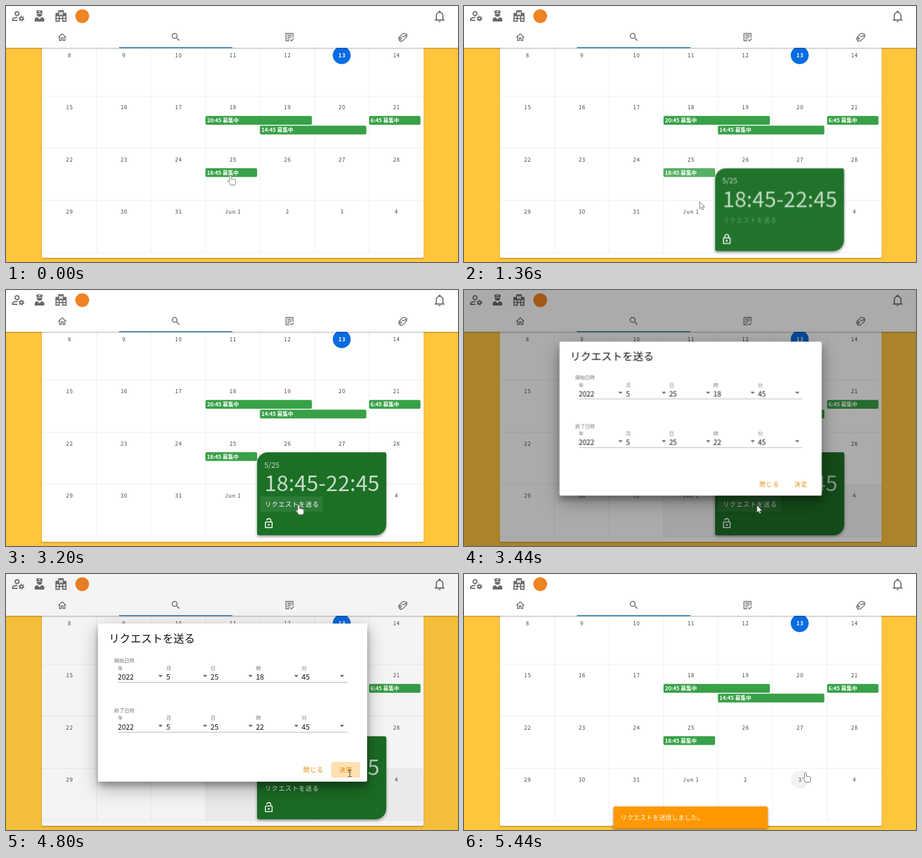
Write an HTML page that moves like this. It is 756 px wide and 429 px high and loops after 5520 ms.

```html
<!DOCTYPE html>
<html lang="ja">
<head>
<meta charset="utf-8">
<title>シフトのリクエスト</title>
<style>
html, body { margin: 0; width: 100%; height: 100%; overflow: hidden; background: #ffc53d; }
svg { display: block; width: 756px; height: 429px; }
text { font-family: "Noto Sans CJK JP", "Noto Sans JP", "Noto Sans", sans-serif; }
.day { font-size: 9px; letter-spacing: .9px; text-anchor: middle; fill: #444; }
.event rect { fill: #38a147; }
.event text { font-size: 9px; font-weight: 700; fill: #fff; }
.icon { fill: #6b6b6b; }
.line { fill: none; stroke: #6b6b6b; }
.request { font-size: 10.5px; letter-spacing: .85px; fill: #fff; }
.title { font-size: 18px; font-weight: 300; fill: #111; }
.label { font-size: 8.4px; fill: #777; }
.value { font-size: 12px; font-weight: 300; fill: #111; }
.action { font-size: 10.5px; letter-spacing: .9px; font-weight: 500; fill: #e08a00; }

.anim { animation: 5520ms cubic-bezier(.25, .8, .25, 1) infinite both; }
.step { animation-timing-function: step-end; }
#pressed { animation-name: pressed; }
#card { animation-name: card; transform-origin: 420px 272px; }
.locked { animation-name: locked; }
.unlocked { animation-name: unlocked; }
#halo { animation-name: halo; }
#focus { animation-name: focus; }
#outside { animation-name: outside; }
#shade { animation-name: shade; animation-timing-function: ease; }
#dialog { animation-name: dialog; transform-origin: 379px 215.5px; }
#ripple { animation-name: ripple; }
#hover { animation-name: hover; }
#snack { animation-name: snack; transform-origin: 379px 407.5px; }
#cursor { animation-name: move; animation-timing-function: ease-in-out; }
#hand { animation-name: hand; }
#arrow { animation-name: arrow; }
#beam { animation-name: beam; }

@keyframes pressed { 0%, 20% { opacity: 1 } 22.5%, 27% { opacity: .85 } 30.4%, 100% { opacity: 1 } }
@keyframes card {
  0%, 21% { opacity: 0; transform: scale(.9) }
  26.45%, 88.4% { opacity: 1; transform: none }
  90.6%, 100% { opacity: 0; transform: none }
}
@keyframes locked { 0% { opacity: 1 } 42%, 100% { opacity: 0 } }
@keyframes unlocked { 0% { opacity: 0 } 42%, 100% { opacity: 1 } }
@keyframes halo { 0%, 35.5% { opacity: 0 } 37.5%, 45.5% { opacity: 1 } 48.5%, 100% { opacity: 0 } }
@keyframes focus { 0%, 51% { opacity: 0 } 53%, 63% { opacity: 1 } 66%, 100% { opacity: 0 } }
@keyframes outside { 0%, 59.4% { opacity: 0 } 62.3%, 87.7% { opacity: .04 } 90.6%, 100% { opacity: 0 } }
@keyframes shade { 0%, 59.4% { opacity: 0 } 62.3%, 84.8% { opacity: .33 } 88.6%, 100% { opacity: 0 } }
@keyframes dialog {
  0%, 59.4% { opacity: 0; transform: scale(.5) }
  62% { opacity: 1 }
  64.86%, 87.7% { opacity: 1; transform: none }
  91.3%, 100% { opacity: 0; transform: scale(.5) }
}
@keyframes ripple { 0%, 83% { opacity: 0 } 85.5%, 100% { opacity: 1 } }
@keyframes hover { 0%, 90.6% { opacity: 0 } 93%, 100% { opacity: 1 } }
@keyframes snack { 0%, 91.3% { opacity: 0; transform: scale(.8) } 94%, 100% { opacity: 1; transform: none } }
@keyframes move {
  0%, 19.93% { transform: translate(375.5px, 284px) }
  24.64% { transform: translate(394px, 328px) }
  36.2%, 41.7% { transform: translate(441px, 388px) }
  44.93% { transform: translate(457px, 383px) }
  54.35% { transform: translate(489px, 360px) }
  62.3% { transform: translate(490px, 361px) }
  72.5% { transform: translate(566px, 332px) }
  76.8%, 84% { transform: translate(568px, 333px) }
  86.96% { transform: translate(575px, 334px) }
  98.55%, 100% { transform: translate(571px, 333px) }
}
@keyframes hand {
  0% { opacity: 1 } 21.7% { opacity: 0 } 35.5% { opacity: 1 } 43.8% { opacity: 0 }
  50.7% { opacity: 1 } 60.8% { opacity: 0 } 71.7% { opacity: 1 } 85.5% { opacity: 0 } 90.6%, 100% { opacity: 1 }
}
@keyframes arrow {
  0% { opacity: 0 } 21.7% { opacity: 1 } 35.5% { opacity: 0 } 43.8% { opacity: 1 }
  50.7% { opacity: 0 } 60.8% { opacity: 1 } 71.7%, 100% { opacity: 0 }
}
@keyframes beam { 0% { opacity: 0 } 85.5% { opacity: 1 } 90.6%, 100% { opacity: 0 } }
</style>
</head>
<body>
<svg viewBox="0 0 756 429">
  <defs>
    <filter id="soft" x="-10%" y="-10%" width="120%" height="130%">
      <feDropShadow dx="0" dy="1.2" stdDeviation="1.3" flood-opacity=".3"/>
    </filter>
    <filter id="raised" x="-10%" y="-10%" width="120%" height="130%">
      <feDropShadow dx="0" dy="2" stdDeviation="2.5" flood-opacity=".42"/>
    </filter>
    <filter id="deep" x="-20%" y="-25%" width="140%" height="160%">
      <feDropShadow dx="0" dy="7" stdDeviation="5" flood-opacity=".25"/>
      <feDropShadow dx="0" dy="10" stdDeviation="15" flood-opacity=".3"/>
    </filter>
  </defs>

  <rect width="756" height="429" fill="#ffc53d"/>
  <rect x="60" y="40" width="638.5" height="382" rx="3" fill="#fff" filter="url(#soft)"/>
  <rect id="outside" class="anim" x="334" y="326" width="364.5" height="87"/>
  <circle cx="561.5" cy="82.5" r="15" fill="#0a6ce2"/>
  <circle id="hover" class="anim" cx="561.5" cy="344.5" r="15" fill="#f2f2f2"/>
  <g id="grid"></g>
  <g id="events"></g>

  <rect x="-5" y="-5" width="766" height="75" fill="#fff" filter="url(#soft)"/>
  <rect x="189" y="69" width="189.5" height="1.6" fill="#2672a8"/>

  <g class="line" stroke-width="1.9">
    <circle cx="18.5" cy="12.8" r="3.3"/>
    <path d="M19 19.2Q11 19.3 11 22.6V24H19"/>
    <circle cx="25.8" cy="21" r="2.4"/>
    <circle cx="25.8" cy="21" r="4" stroke-width="1.6" stroke-dasharray="2.1 2.09"/>
  </g>
  <g class="icon">
    <path d="M50.5 8.5Q56 5.5 61.5 8.5L60.5 12V14.5Q59.8 18 56 18T51.5 14.5V12Z"/>
    <path d="M48 26V22.5Q48 19.5 52.5 18.8L56 22 59.5 18.8Q64 19.5 64 22.5V26Z"/>
    <path d="M56 7.8v3M54.5 9.3h3M52.5 12.6h7" stroke="#fff" stroke-width="1"/>
    <path transform="translate(80.8 6) scale(.93)" d="M2 22V7A1 1 0 0 1 3 6H7V2A1 1 0 0 1 8 1H16A1 1 0 0 1 17 2V6H21A1 1 0 0 1 22 7V22H14V17H10V22H2M9 4V10H11V8H13V10H15V4H13V6H11V4H9M4 20H8V17H4V20M4 15H8V12H4V15M16 20H20V17H16V20M16 15H20V12H16V15M10 15H14V12H10V15Z"/>
    <path transform="translate(714.2 6) scale(.92)" d="M10 21H14C14 22.1 13.1 23 12 23S10 22.1 10 21M21 19V20H3V19L5 17V11C5 7.9 7 5.2 10 4.3V4C10 2.9 10.9 2 12 2S14 2.9 14 4V4.3C17 5.2 19 7.9 19 11V17L21 19M17 11C17 8.2 14.8 6 12 6S7 8.2 7 11V18H17V11Z"/>
    <path transform="translate(85 43.4) scale(.75)" d="M12 5.69L17 10.19V18H15V12H9V18H7V10.19L12 5.69M12 3L2 12H5V20H11V14H13V20H19V12H22"/>
    <path transform="translate(275 43) scale(.75)" d="M9.5 3A6.5 6.5 0 0 1 16 9.5C16 11.11 15.41 12.59 14.44 13.73L14.71 14H15.5L20.5 19 19 20.5 14 15.5V14.71L13.73 14.44C12.59 15.41 11.11 16 9.5 16A6.5 6.5 0 0 1 9.5 3M9.5 5C7 5 5 7 5 9.5S7 14 9.5 14 14 12 14 9.5 12 5 9.5 5Z"/>
  </g>
  <g class="line" stroke-width="1.4">
    <path d="M474 58.3H468.3V46H480V53M470.5 49h7.3M470.5 52h7.3M470.5 55h4M475.5 56.5l2 2 3.8-4"/>
    <path d="M657.5 52.5l5-5.5 3.5-1.3 4.6 2.3-.8 4.4-6.5 6-3.5 1-1.6-1.8-1.4-2ZM662.5 50.5l3 1 2.3-2 2.5 2M656.8 55.5l3-2.6 2 1.4-3.2 3.2"/>
  </g>
  <circle cx="127.5" cy="17" r="11.5" fill="#f08324"/>

  <g id="card" class="anim">
    <path filter="url(#raised)" fill="#1b7025" d="M438 272H633a3 3 0 0 1 3 3V393a18 18 0 0 1-18 18H423a3 3 0 0 1-3-3V290a18 18 0 0 1 18-18Z"/>
    <g fill="#fff" fill-opacity=".75">
      <text x="432" y="297.5" font-size="12.3">5/25</text>
      <text x="432.5" y="336.7" font-size="36">18:45-22:45</text>
    </g>
    <rect id="focus" class="anim" x="425" y="346" width="105" height="25.5" rx="2" fill="#fff" fill-opacity=".08"/>
    <circle id="halo" class="anim" cx="439.5" cy="391.3" r="13.5" fill="#fff" fill-opacity=".3"/>
    <g class="anim step locked">
      <text class="request" x="433" y="362.8" opacity=".32">リクエストを送る</text>
      <path transform="translate(429.9 381.5) scale(.8)" fill="#fff" d="M12 17A2 2 0 0 1 12 13A2 2 0 0 1 12 17M18 20V10H6V20H18M18 8A2 2 0 0 1 20 10V20A2 2 0 0 1 18 22H6A2 2 0 0 1 4 20V10A2 2 0 0 1 6 8H7V6A5 5 0 0 1 17 6V8H18M12 3A3 3 0 0 0 9 6V8H15V6A3 3 0 0 0 12 3Z"/>
    </g>
    <g class="anim step unlocked">
      <text class="request" x="433" y="362.8" font-weight="500">リクエストを送る</text>
      <path transform="translate(429.9 381.5) scale(.8)" fill="#fff" d="M12 17A2 2 0 0 1 12 13A2 2 0 0 1 12 17M18 20V10H6V20H18M18 8A2 2 0 0 1 20 10V20A2 2 0 0 1 18 22H6A2 2 0 0 1 4 20V10A2 2 0 0 1 6 8H15V6A3 3 0 0 0 9 6H7A5 5 0 0 1 17 6V8H18Z"/>
    </g>
  </g>

  <rect id="shade" class="anim" width="756" height="429"/>

  <g id="dialog" class="anim">
    <rect x="154" y="83" width="450" height="265" rx="3" fill="#fff" filter="url(#deep)"/>
    <text class="title" x="172" y="114.5">リクエストを送る</text>
    <g id="fields"></g>
    <rect id="ripple" class="anim" x="544" y="315" width="48" height="26.5" rx="3" fill="#ffe0b2"/>
    <text class="action" x="497" y="332.3">閉じる</text>
    <text class="action" x="557" y="332.3">決定</text>
  </g>

  <g id="snack" class="anim">
    <rect x="250" y="389.5" width="258" height="36.5" rx="3" fill="#ff9800" filter="url(#raised)"/>
    <text x="262" y="411.8" font-size="10.5" letter-spacing=".19" fill="#fff">リクエストを送信しました。</text>
  </g>

  <g id="cursor" class="anim" fill="#fff" stroke="#666" stroke-width=".9" stroke-linejoin="round">
    <path id="hand" class="anim step" d="M-1.5 1.2a1.5 1.5 0 0 1 3 0V6.3q1.5-1 2.6.2 1.6-.7 2.6.4 1.8-.4 2 1.2V11q0 2.5-1.6 5H0q-1-3-4.5-6.3 0-1.8 2-1.1l1 1Z"/>
    <path id="arrow" class="anim step" d="M0 0V12l2.8-2.6 1.8 4.2 2-.9-1.8-4h3.8Z"/>
    <path id="beam" class="anim step" fill="none" stroke="#222" d="M-3-5.5h2.2l.8.8.8-.8H3M0-4.7V4.7M-3 5.5h2.2l.8-.8.8.8H3"/>
  </g>
</svg>
<script>
const fill = (id, html) => { document.getElementById(id).innerHTML = html; };
const text = (cls, x, y, s, extra = "") => `<text class="${cls}" x="${x}" y="${y}" ${extra}>${s}</text>`;

// Calendar: four weeks starting on the 8th
const COL = 91.15, ROW = 87.4;
let grid = "";
for (let i = 1; i < 7; i++) grid += `<path d="M${60.3 + COL * i} 70V413"/>`;
for (let i = 0; i < 4; i++) grid += `<path d="M60 ${151 + ROW * i}H698.5"/>`;
grid = `<g stroke="#ededed" stroke-width=".9">${grid}</g>`;
for (let i = 0; i < 28; i++) {
  const day = i + 8;
  const name = day === 32 ? "Jun 1" : day > 32 ? day - 31 : day;
  const x = 106.4 + COL * (i % 7), y = 86 + ROW * Math.floor(i / 7);
  grid += text("day", x, y, name, day === 13 ? 'style="fill:#fff;font-weight:700"' : "");
}
fill("grid", grid);

const event = (x, y, w, time, id = "") =>
  `<g class="event${id && " anim"}" id="${id || "at" + x}"><rect x="${x}" y="${y}" width="${w}" height="14.8" rx="2.5"/>` +
  text("", x + 2.5, y + 11, time + " 募集中") + "</g>";
fill("events",
  event(333.7, 184.2, 178, "20:45") + event(424.7, 200.4, 178, "14:45") +
  event(607.3, 184.2, 86, "6:45") + event(333.5, 271.8, 86.5, "18:45", "pressed"));

// Start and end date rows: unit, left edge, arrow centre
const units = [["年", 187, 258.5], ["月", 268, 333], ["日", 342, 409], ["時", 418, 485.5], ["分", 494.5, 562]];
const dateRow = (y, title, values) =>
  text("label", 181, y, title) +
  units.map(([unit, x, ax], i) =>
    text("label", x, y + 12.7, unit) + text("value", x, y + 29.3, values[i]) +
    `<path fill="#666" d="M${ax - 3.7} ${y + 21.2}h7.4l-3.7 3.8Z"/>`).join("") +
  `<path stroke="#aaa" stroke-width=".9" d="M187 ${y + 33.6}H571"/>`;
fill("fields",
  dateRow(148, "開始日時", [2022, 5, 25, 18, 45]) +
  dateRow(231.6, "終了日時", [2022, 5, 25, 22, 45]));
</script>
</body>
</html>
```
